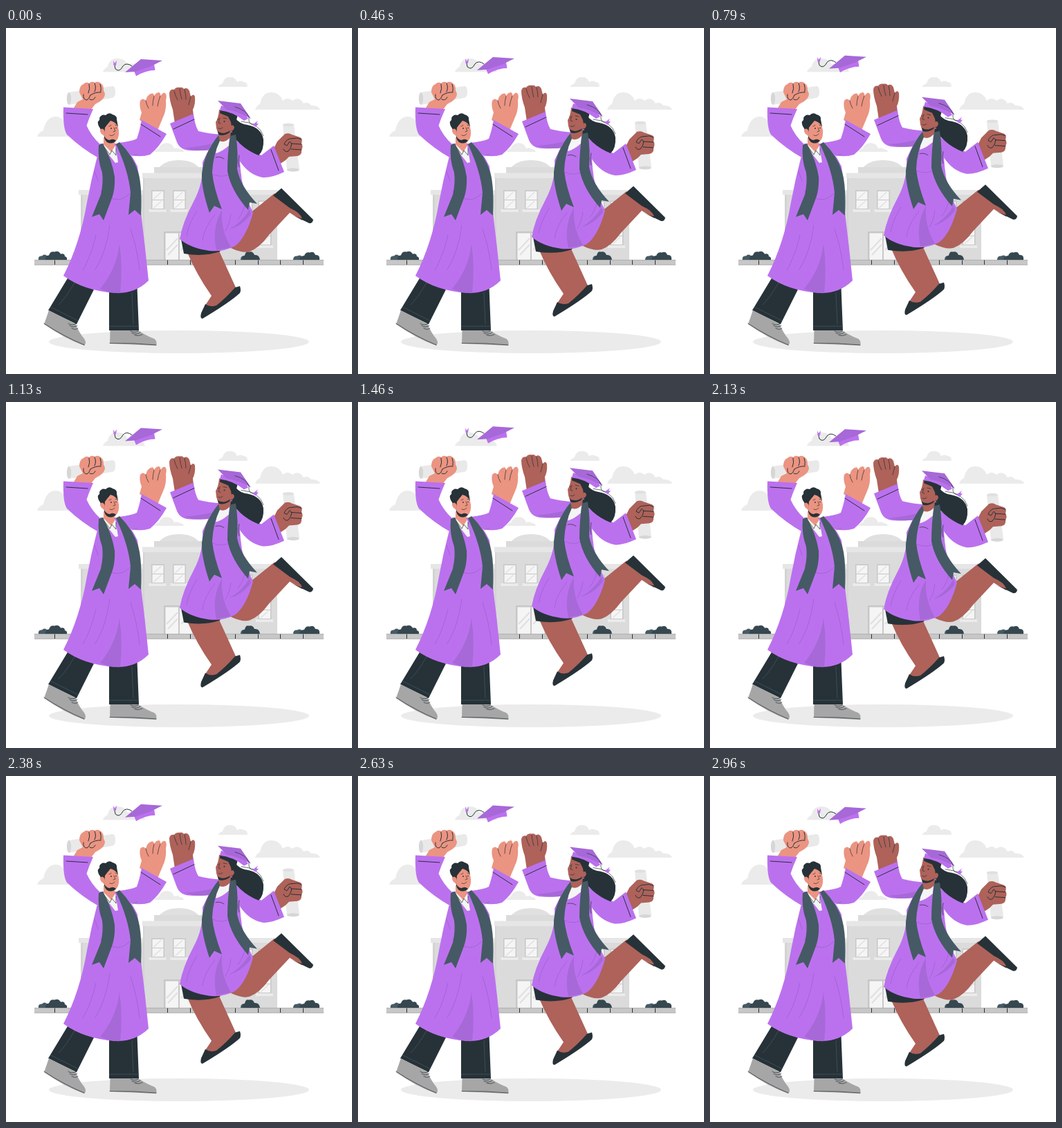
These frames come from a looping animation (500x500 px, 3000 ms). An HTML page:

```html
<!DOCTYPE html>
<html lang="en">
<head>
<meta charset="utf-8">
<title>Graduation jump</title>
<style>
html, body { margin: 0; height: 100%; overflow: hidden; background: #fff; }
svg { display: block; width: 100vw; height: 100vh; }
.gown { fill: #bb71ee; }
.shade { fill: #a768d8; }
.dark { fill: #263238; }
.scarf { fill: #455a64; }
.skin { fill: #eb9481; }
.brown { fill: #ae6259; }
.paper { fill: #e9e9e9; }
.fold { fill: none; stroke: #9d5ecb; stroke-width: .7; stroke-linecap: round; }
.ink { fill: none; stroke: #263238; stroke-width: 1; stroke-linecap: round; stroke-linejoin: round; }
.thin { stroke-width: .7; }
.crease { fill: none; stroke: #455a64; stroke-width: .7; }
</style>
</head>
<body>
<svg viewBox="0 0 500 500">
  <g id="clouds" fill="#ebebeb">
    <path d="M140 63.500Q142 58 147 56Q149 44 161 44Q172 44 176 53Q184 49 189 55Q198 54 201 63.500Z"/>
    <path d="M306 85Q309 81 313 80Q315 71 323 71Q331 70 334 78Q340 75 343 78Q349 78 349 85Z"/>
    <path d="M360 118Q362 112 367 110Q370 94 382 93Q395 92 400 105Q407 99 414 105Q423 98 430 109Q437 106 441 112Q451 111 454 118Z"/>
    <path d="M45 157Q47 151 54 148Q58 129 71 128Q82 128 87 141Q96 136 102 143Q110 140 115 148L123 157Z"/>
    <path d="M214 179Q217 175 221 174Q224 166 233 166Q241 167 243 174Q249 172 251 175Q256 175 257 179Z"/>
  </g>

  <g id="building">
    <path fill="#e0e0e0" d="M221 202Q230 191 250 191Q270 191 279 202Z"/>
    <path fill="#dbdbdb" d="M214 201H292V210H214ZM108 240H392V335H108ZM199 216H308V335H199Z"/>
    <path fill="#e6e6e6" d="M105 234H198V241H105ZM308 234H396V241H308ZM197 209.500H310V217H197Z"/>
    <path fill="#d3d3d3" d="M198 217H200V335H198ZM108 241H111V335H108Z"/>
    <g id="windows"></g>
    <path fill="#c7c7c7" d="M228 294H272V335H228Z"/>
    <path fill="#f5f5f5" d="M230.500 296.500H249V335H230.500ZM251 296.500H269.500V335H251Z"/>
    <path stroke="#e0e0e0" stroke-width="2" d="M232 321L248 304M234 328L248 313M253 321L269 304"/>
  </g>

  <ellipse cx="250" cy="453.500" rx="188" ry="16.500" fill="#ebebeb"/>
  <path fill="#c7c7c7" d="M41 335H459V342.500H41Z"/>
  <path stroke="#a6a6a6" stroke-width=".7" d="M41 335.300H459M41 342.300H459"/>
  <path stroke="#263238" d="M70.500 335.500V342M233.500 335.500V342M266.500 335.500V342M331.500 335.500V342M364.500 335.500V342M396.500 335.500V342M429.500 335.500V342"/>
  <g id="bushes">
    <path class="scarf" d="M47 335Q46 329 52 329.500Q55 326 59 329Q63 328 64 335ZM339 335Q339 329 344 329Q352 324 356 335ZM415 335Q415 329 421 329.500Q427 326 431 335Z"/>
    <path fill="#37474f" d="M57 335Q57 328 62 328.500Q64 322 70 323.500Q76 321 79 326.500Q85 325 85 330Q89 331 88 335ZM341 335Q341 329 345 329Q346 322 351 323.500Q357 322 359 328Q366 327 367 335ZM424 335Q425 329 431 329Q433 323 439 324.500Q445 322 447 328Q454 327 453 335Z"/>
  </g>

  <g id="man">
    <path class="dark" d="M90 360L61 408L102 428L128 376ZM149 380V437H192L189.500 374Z"/>
    <path class="crease" d="M64 403L104 423M149 431H192M99 368Q88 388 76 400M182 382L184 428"/>
    <path fill="#a6a6a6" d="M62 408L101 428Q104 438 113 449Q117 455 113 459Q83 448 55 428ZM150.500 437H191Q203 445 214 449Q219 452 217 459L150 456Z"/>
    <path class="ink thin" d="M55 427Q84 446 113 458M150 455.500Q185 455 217 458M90 427Q95 431 102 427M92 430Q97 434 103 430M95 434Q100 437 104 434M180 438Q186 441 191 438M182 441Q189 444 194 440M186 444Q191 446 197 443"/>

    <g id="raisedFist">
      <path class="paper" d="M90 93L154 84Q158 84 158 92Q158 100 154 101L91 111Z"/>
      <ellipse cx="91" cy="102" rx="3.200" ry="9" fill="#d6d6d6"/>
      <path class="skin" d="M97 117L103 107L111 103L106 93Q106 83 112 81Q116 77 120 80Q124 76 128 79Q133 76 137 80Q141 82 141 90L143 95Q143 101 136 106L129 110L122 119Z"/>
      <path class="ink" d="M120 81Q122 87 119 94M128 80Q131 86 128 92M136 81Q138 86 137 92M122 97Q130 92 137 93M112 96Q111 104 117 104Q120 103 122 97M121 103Q126 106 129 100"/>
    </g>
    <path class="gown" d="M83 114.500L126 117Q120 130 116.500 141Q123 156 136 168L134 188Q109 174 88 154Q82 145 83 114.500Z"/>
    <path class="ink" d="M87 123L118 125"/>

    <g id="openHand">
      <path class="skin" d="M193 133L196 122Q192 113 194 105Q198 100 202 105Q204 97 209 95Q214 93 214 99Q216 93 221 93Q224 94 223 99Q226 93 230 94Q233 97 231 104Q232 114 229 124L219 148Z"/>
      <path class="ink thin" d="M202 105Q203 111 206 116M214 98Q212 106 212 112M223 98Q220 106 219 113"/>
    </g>
    <path class="gown" d="M161 166Q181 164 189 160Q193 149 196 133L232 153Q221 173 208 183Q196 187 181 184Z"/>
    <path class="ink" d="M195 139L223 157"/>

    <path class="gown" d="M136 167L165 167Q181 180 190 200Q194 230 195 267Q201 315 206 365Q187 384 158 383Q113 380 83 358Q107 311 117 252Q123 219 132 185Z"/>
    <path class="shade" d="M164 312Q160 348 136 377Q153 384 165 383Q169 346 164 312Z"/>
    <path class="fold" d="M155 247Q168 251 180 238M136 235Q144 244 155 247M130 299Q123 330 111 350M150 285Q145 324 129 349M180 290Q190 320 193 350M128 207L133 221M182 185L190 182"/>

    <path class="skin" d="M141 158L156 160L159 178L152 187L141 174Z"/>
    <path fill="#f5f5f5" d="M141 168L152 179L158 170L162 194L158 195L143 176Z"/>
    <path class="ink thin" d="M142 172L150 183L153 177L159 184L159 174"/>
    <path class="skin" d="M136 137Q145 126 160 135L163 148Q164 161 157 165Q147 167 142 155Q136 153 136 147Z"/>
    <path class="dark" d="M139 149Q131 139 133 135Q136 133 135 130Q138 124 144 126Q149 121 154 125Q161 127 160 132L162 143Q159 136 151 134Q145 141 143 144L142 155Z"/>
    <path class="skin" d="M136 147Q140 143 142.500 149Q144 155 141 155Q136 152 136 147Z"/>
    <path class="dark" d="M141.500 154Q144 162 150 162Q155 159 159 163Q153 169 146 165Q142 162 141.500 154Z"/>
    <path class="ink thin" d="M156 144L158 149L155 150M149 142L152 140.500M158 140L160 141M150 155Q154 157 157 153"/>
    <circle cx="152" cy="145" r=".9" class="dark"/><circle cx="159" cy="144.500" r=".8" class="dark"/>

    <path class="scarf" d="M134 169L140 167Q153 190 157 215Q158 232 153 246L141 278L135 269L124 273L137 241Q141 223 139 209Q132 190 134 169ZM159 168L164 165Q184 185 191 208Q197 229 195 271L186 263L177 270L180 238Q177 206 159 168Z"/>
  </g>

  <g id="airborne">
    <g id="flyingCap">
      <path class="ink" d="M182 55Q174 49 169 55Q164 65 158 59L157 54"/>
      <path class="gown" d="M155 47L157 51L160 47L159 54L155.500 54Z"/>
      <path class="gown" d="M185 62L214 52L215.500 61Q202 61 188 69.500Z"/>
      <path class="shade" d="M172 64L195 45L226 47L210 55L187 63Z"/>
    </g>

    <g id="backArm">
      <path class="paper" d="M400 140Q408 137 416 140L424 204Q415 209 406 206Z"/>
      <ellipse cx="408" cy="140" rx="8" ry="2.300" fill="#e0e0e0"/>
      <ellipse cx="415" cy="205" rx="8.800" ry="2.500" fill="#d6d6d6"/>
      <path class="brown" d="M387 174L392 164L403 153Q409 151 413 154L425 158Q429 160 427 167Q430 171 427 176Q428 184 421 185L409 186L404 191L395 197Z"/>
      <path class="ink" d="M411 160L421 159L427 161M412 167L427 168M412 175L427 176M410 160Q404 162 402 168L406 170L410 164L413 167Q412 174 408 178Q403 180 401 175"/>
      <path class="gown" d="M329 160Q353 177 369 184L387 170L402 208Q383 217 371 216Q350 212 337 191Z"/>
      <path class="ink" d="M383 176L394 206"/>
    </g>

    <path class="dark" d="M322 123L331 130Q338 139 349 140Q369 144 372 161Q373 177 365 184Q350 178 339 168Q331 159 324 158Z"/>
    <path class="ink thin" d="M340 135Q366 137 372 156"/>

    <g id="legs">
      <path class="brown" d="M261 322L307 320L332 375L305 407L287 402L297 387Q275 356 261 322Z"/>
      <path class="dark" d="M288 399Q295 404 304 401Q318 390 331 375L338 373Q340 379 338 383Q324 396 284 420Q280 420 282 412Z"/>
      <path class="brown" d="M325 318L352 268L388 239L429 273L428 278L410 267L380 299Q366 318 352 323Q342 326 325 318Z"/>
      <path class="dark" d="M386 242L398 231.500L444 277Q443 283 438 282L411 269Q424 275 428 275Q425 267 410 260Z"/>
      <path class="dark" d="M252 300L257 326Q286 331 309 323L314 316Z"/>
    </g>

    <g id="raisedHand">
      <path class="brown" d="M244 138L241 118Q236 104 236 94Q237 88 243 89Q246 85 251 86Q255 85 257 88Q262 85 265 91L267 99Q271 94 273 99Q274 110 270 118L271 127Z"/>
      <path class="ink thin" d="M243 91Q245 99 248 104M251 88Q252 97 254 103M258 89Q260 96 260 103M267 99L264 111"/>
    </g>
    <path class="gown" d="M237 138L271 124Q273 141 278 149Q293 153 312 154L303 175Q283 178 267 177Q252 177 247 165Z"/>
    <path class="shade" d="M258 173Q280 172 302 166V175Q276 180 258 173Z"/>
    <path class="ink" d="M242 146L272 132"/>

    <path class="gown" d="M303 155L329 157Q338 178 339 205Q341 235 357 267Q347 303 331 315Q314 324 294 322Q266 318 251 305Q255 281 271 251Q286 223 284 194Z"/>
    <path class="shade" d="M312 263Q297 288 304 321L325 317Q310 292 312 263ZM352 262Q340 282 322 291Q340 287 354 269Z"/>
    <path class="fold" d="M298 211Q310 217 321 212M302 270Q286 289 284 307M276 264Q264 283 261 300M325 269Q323 284 317 293M346 250Q344 266 335 277"/>
    <path class="ink thin" d="M303 187Q309 185 315 189M337 184Q335 195 337 201"/>

    <g id="womanHead">
      <path fill="#f5f5f5" d="M306 162L323 158L322 170Q312 179 303 181Z"/>
      <path class="brown" d="M308 146L326 142L324 158Q315 168 307 162Z"/>
      <path class="dark" d="M305 147Q311 154 324 147L323 151Q314 157 307 154Z"/>
      <path class="brown" d="M308 118L327 122L330 139Q326 150 315 152Q305 152 304 145L303 136Q307 130 308 118Z"/>
      <path class="dark" d="M310 116L335 125L331 141L327 149L325 136L321 128L309 123Z"/>
      <path class="brown" d="M324 142Q329 138 330 144Q328 150 324 148Z"/>
      <path class="ink thin" d="M309 130L307 137L310 138M314 130L319 131M307 145Q310 147 313 144"/>
      <circle class="dark" cx="315.500" cy="135" r="1"/><circle class="dark" cx="306.500" cy="132" r=".7"/>
      <circle cx="326" cy="150" r="1" fill="#bb71ee"/>
      <path class="gown" d="M311 112L345 124L350 131L344 134Q328 121 309 119Z"/>
      <path class="shade" d="M306 105L339 109L354 131Q334 120 319 118Z"/>
      <path class="ink thin" d="M331 114Q348 119 351 129Q350 141 358 139"/>
      <path class="gown" d="M356 140L364 134L362 138L365 138L361 143Z"/>
    </g>

    <path class="scarf" d="M307 155L309 163Q299 184 298 209Q300 231 312 262L301 257L294 267Q282 231 283 211Q286 181 307 155ZM324 156L332 154Q336 180 334 204Q339 229 363 254L352 252L350 263Q325 235 320 207Q320 180 324 156Z"/>
  </g>
</svg>
<script>
const LOOP = 3000, FPS = 24, RISE = 10;
const airborne = document.getElementById("airborne");

const windowAt = (x, y) => `<g transform="translate(${x} ${y})">
  <path fill="#c7c7c7" d="M-.5-.5H18.500V27H-.5Z"/>
  <path fill="#f5f5f5" d="M1 1H17V13H1ZM1 14H17V26H1Z"/>
  <path stroke="#e0e0e0" stroke-width="1.500" d="M3 12L14 2M3 25L14 15"/>
  <path fill="#ebebeb" d="M-4 27H21V31H-4Z"/></g>`;

document.getElementById("windows").innerHTML =
  [[210.5, 235], [241.5, 235], [338, 250], [365, 250], [365, 287]]
    .map(p => windowAt(...p)).join("");

function render(ms) {
  const step = Math.floor((ms % LOOP) * FPS / 1000 + 0.05);
  const phase = step / FPS * 1000 / LOOP;
  const lift = RISE * (1 - Math.abs(1 - 2 * phase));
  airborne.setAttribute("transform", `translate(0 ${-lift})`);
}

const start = performance.now();
function tick() {
  render(performance.now() - start);
  requestAnimationFrame(tick);
}
tick();
</script>
</body>
</html>
```
